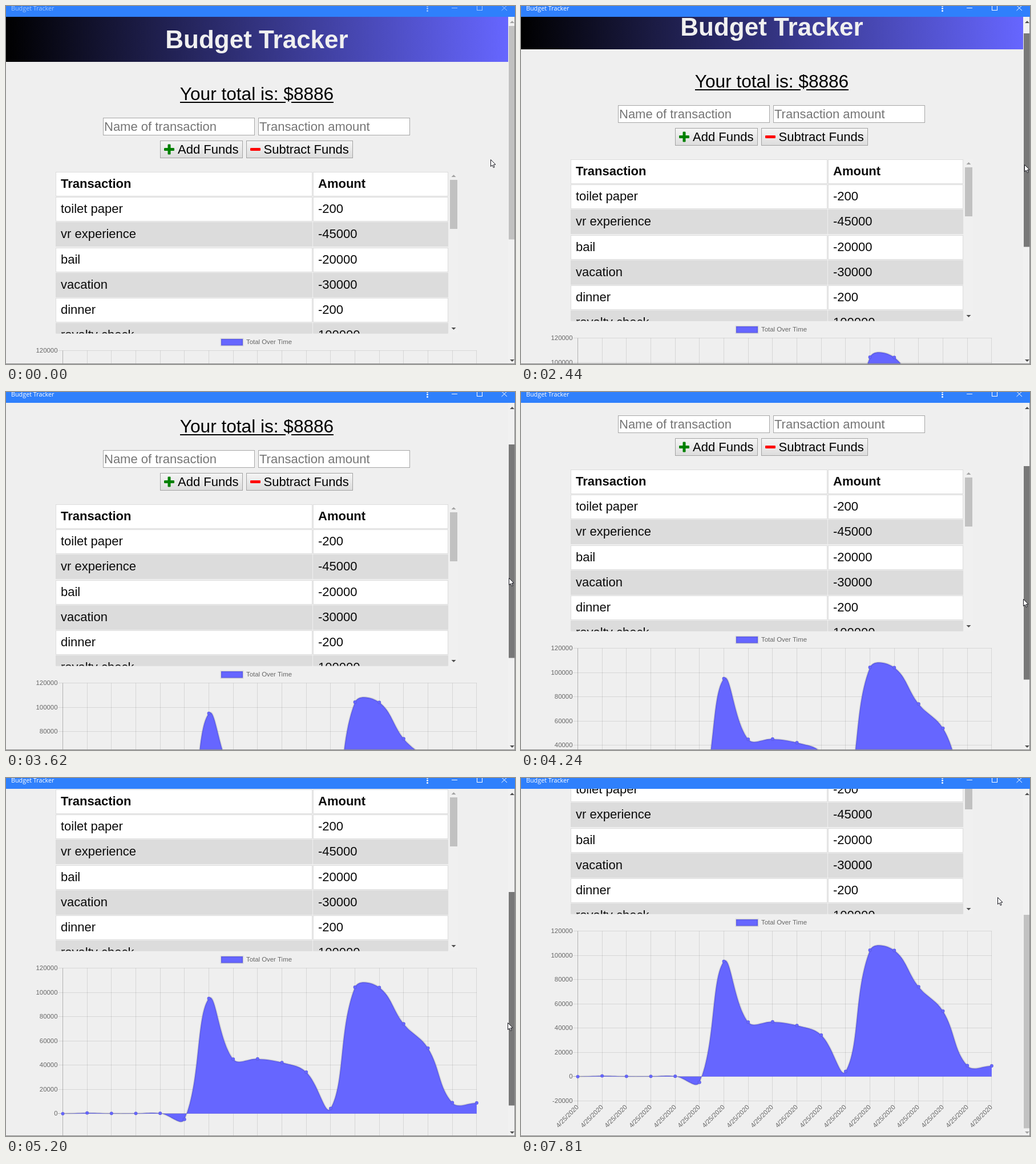
An HTML page with a canvas for the animation above (8 s loop, 892 by 628 pixels).

```html
<!DOCTYPE html>
<html lang="en">
<head>
<meta charset="utf-8">
<title>Budget Tracker</title>
<style>
html, body { margin: 0; width: 100%; height: 100%; overflow: hidden; background: #efefef; }
canvas { display: block; }
</style>
</head>
<body>
<canvas id="stage" width="892" height="628"></canvas>
<script>
const ctx = document.getElementById('stage').getContext('2d');
const LOOP = 8000, BAR = 19, PAGE_W = 880, MAX_SCROLL = 336;
const SANS = '"Liberation Sans", Arial, sans-serif';
const BLUE = '#6666ff';

// Stepped movement: first step, last step, number of steps, then scroll, x, y reached
const MOVES = [
  [0, 0, 1, 0, 849, 269],
  [130, 130, 1, 0, 867, 270],
  [270, 270, 1, 0, 882, 266],
  [2130, 2440, 3, 22, 882, 278],
  [2570, 3090, 5, 62, 882, 305],
  [3210, 3620, 4, 94, 881, 326],
  [3780, 3940, 2, 135, 880, 351],
  [4240, 4630, 3, 196, 879, 388],
  [4830, 5200, 3, 271, 879, 429],
  [5330, 6030, 6, 311, 877, 454],
  [6170, 6340, 2, 336, 874, 472],
  [6600, 6870, 3, 336, 874, 509],
  [7150, 7540, 4, 336, 824, 262],
  [7670, 7810, 2, 336, 835, 209]
];

const ROWS = [
  ['Transaction', 'Amount'],
  ['toilet paper', '-200'],
  ['vr experience', '-45000'],
  ['bail', '-20000'],
  ['vacation', '-30000'],
  ['dinner', '-200'],
  ['royalty check', '100000']
];

const TOTALS = [0, 600, 200, 200, 300, -4700, 95000, 45000, 45200, 42200, 34286,
  4286, 104286, 104086, 74086, 54086, 9086, 8886];

const chart = { left: 99.5, top: 604.5, dx: 42.67, dy: 42.55 };
chart.right = chart.left + 17 * chart.dx;
chart.bottom = chart.top + 7 * chart.dy;
chart.zero = chart.top + 6 * chart.dy;

function stateAt(t) {
  let prev = MOVES[0].slice(3), now = prev;
  for (const [from, to, n, ...end] of MOVES) {
    if (t < from) break;
    const gap = n > 1 ? (to - from) / (n - 1) : 1;
    const done = Math.min(n, Math.floor((t - from) / gap + 1e-6) + 1) / n;
    now = end.map((v, i) => Math.round(prev[i] + (v - prev[i]) * done));
    prev = end;
  }
  return { scroll: now[0], x: now[1], y: now[2] };
}

function rect(x, y, w, h, color) {
  ctx.fillStyle = color;
  ctx.fillRect(x, y, w, h);
}

function box(x, y, w, h, fill, border) {
  rect(x, y, w, h, border);
  rect(x + 1, y + 1, w - 2, h - 2, fill);
}

function text(str, x, y, size, color, weight = '', family = SANS) {
  ctx.font = `${weight} ${size}px ${family}`;
  ctx.fillStyle = color;
  ctx.fillText(str, x, y);
}

function line(x1, y1, x2, y2, color, width = 1) {
  ctx.strokeStyle = color;
  ctx.lineWidth = width;
  ctx.beginPath();
  ctx.moveTo(x1, y1);
  ctx.lineTo(x2, y2);
  ctx.stroke();
}

function clip(x, y, w, h) {
  ctx.save();
  ctx.beginPath();
  ctx.rect(x, y, w, h);
  ctx.clip();
}

function arrow(x, y, dir, color) {
  ctx.fillStyle = color;
  ctx.beginPath();
  ctx.moveTo(x - 4, y - 2 * dir);
  ctx.lineTo(x + 4, y - 2 * dir);
  ctx.lineTo(x, y + 2 * dir);
  ctx.fill();
}

function pill(x, y, w, h, color) {
  ctx.fillStyle = color;
  ctx.beginPath();
  ctx.roundRect(x, y, w, h, 1.3);
  ctx.fill();
}

function drawHeader() {
  const g = ctx.createLinearGradient(0, 0, PAGE_W, 0);
  g.addColorStop(0, '#000');
  g.addColorStop(1, BLUE);
  rect(0, 19, PAGE_W, 79, g);
  ctx.textAlign = 'center';
  text('Budget Tracker', 439.5, 74, 44, '#f0f0f0', 'bold');
  text('Your total is: $8886', 439.5, 165, 31.6, '#000');
  ctx.textAlign = 'left';
  rect(305, 168, 185, 2, '#000');
  rect(500, 168, 74, 2, '#000');
}

function drawButton(x, w, label, labelX) {
  const g = ctx.createLinearGradient(0, 237, 0, 267);
  g.addColorStop(0, '#f5f5f5');
  g.addColorStop(1, '#dcdcdc');
  box(x, 236, w, 31, g, '#a2a2a2');
  text(label, labelX, 259, 22, '#000');
}

function drawForm() {
  box(170, 196, 266, 31, '#fff', '#a6a6a6');
  box(442, 196, 266, 31, '#fff', '#a6a6a6');
  text('Name of transaction', 172, 219, 22, '#757575');
  text('Transaction amount', 444, 219, 22, '#757575');
  drawButton(270, 145, 'Add Funds', 301);
  drawButton(421, 187, 'Subtract Funds', 451.5);
  pill(277, 249, 18, 5, '#008000');
  pill(283.5, 242.5, 5, 18, '#008000');
  pill(428, 249, 18, 5, '#ff0000');
}

function drawTable() {
  clip(80, 285, 720, 289.5);
  ROWS.forEach(([name, amount], i) => {
    const y = Math.round(291 + i * 44.17);
    const fill = i && i % 2 === 0 ? '#dcdcdc' : '#fff';
    const weight = i ? '' : 'bold';
    box(87, y, 450, 43, fill, '#dcdcdc');
    box(538, y, 237, 43, fill, '#dcdcdc');
    text(name, 96, y + 28, 22, '#0a0a0a', weight);
    text(amount, 547, y + 28, 22, '#0a0a0a', weight);
  });
  rect(777, 291, 15, 284, '#f0f0f0');
  rect(778, 305, 13, 86, '#c1c1c1');
  arrow(784.5, 298, -1, '#a3a3a3');
  arrow(784.5, 566, 1, '#505050');
  ctx.restore();
}

// Cardinal spline whose handles are weighted by the neighbouring distances
function curvePath(pts) {
  const handles = pts.map((p, i) => {
    const a = pts[i - 1] || p, b = pts[i + 1] || p;
    const da = Math.hypot(p.x - a.x, p.y - a.y), db = Math.hypot(b.x - p.x, b.y - p.y);
    const ka = 0.4 * da / (da + db), kb = 0.4 * db / (da + db);
    const vx = b.x - a.x, vy = b.y - a.y;
    return [p.x - ka * vx, p.y - ka * vy, p.x + kb * vx, p.y + kb * vy];
  });
  const path = new Path2D();
  path.moveTo(pts[0].x, pts[0].y);
  for (let i = 1; i < pts.length; i++) {
    path.bezierCurveTo(handles[i - 1][2], handles[i - 1][3],
      handles[i][0], handles[i][1], pts[i].x, pts[i].y);
  }
  return path;
}

const points = TOTALS.map((v, i) => ({
  x: chart.left + i * chart.dx,
  y: chart.zero - v / 20000 * chart.dy
}));
const curve = curvePath(points);
const area = new Path2D(curve);
area.lineTo(chart.right, chart.zero);
area.lineTo(chart.left, chart.zero);
area.closePath();

function drawGrid() {
  const { left, right, top, bottom, dx, dy } = chart;
  const color = zero => zero ? 'rgba(0,0,0,.25)' : 'rgba(0,0,0,.1)';
  ctx.textBaseline = 'middle';
  ctx.textAlign = 'right';
  for (let i = 0; i < 8; i++) {
    const y = Math.floor(top + i * dy) + 0.5;
    line(left - 8.5, y, right, y, color(i === 6));
    text(String(120000 - i * 20000), 90.5, y, 11.4, '#666');
  }
  for (let i = 0; i < 18; i++) {
    const x = Math.floor(left + i * dx) + 0.5;
    line(x, top, x, bottom + 9, color(i === 0));
    ctx.save();
    ctx.translate(x, bottom + 9.5);
    ctx.rotate(-Math.PI / 4);
    text(i < 17 ? '4/25/2020' : '4/28/2020', 0, 0, 11.4, '#666');
    ctx.restore();
  }
  ctx.textAlign = 'left';
}

function drawChart() {
  rect(377, 584, 38, 11.5, BLUE);
  ctx.strokeStyle = 'rgba(0,0,0,.1)';
  ctx.lineWidth = 2.85;
  ctx.strokeRect(377, 584, 38, 11.5);
  drawGrid();
  text('Total Over Time', 421, 589.5, 11.4, '#666');
  ctx.textBaseline = 'alphabetic';

  ctx.fillStyle = BLUE;
  ctx.fill(area);
  ctx.strokeStyle = 'rgba(0,0,0,.1)';
  ctx.lineWidth = 2.85;
  ctx.stroke(curve);
  ctx.lineWidth = 1;
  for (const p of points) {
    ctx.beginPath();
    ctx.arc(p.x, p.y, 2.85, 0, 7);
    ctx.fillStyle = BLUE;
    ctx.fill();
    ctx.stroke();
  }
}

function drawScrollbar(t, scroll) {
  const dragging = t >= 1430 && t < 7150;
  const hover = t >= 270 && t < 1430;
  rect(PAGE_W, BAR, 12, 609, '#f1f1f1');
  rect(881, 35 + Math.round(scroll * 0.61), 10, 374.5,
    dragging ? '#787878' : hover ? '#a8a8a8' : '#c1c1c1');
  arrow(887, 28, -1, scroll > 0 ? '#505050' : '#a3a3a3');
  arrow(887, 622, 1, scroll < MAX_SCROLL ? '#505050' : '#a3a3a3');
  rect(891, BAR, 1, 609, '#8c8c8c');
  rect(0, 627, 892, 1, '#8c8c8c');
}

function drawTitleBar(focused) {
  const ink = focused ? '#fff' : '#a3c7fd';
  rect(0, 0, 892, BAR, '#2f80fc');
  text('Budget Tracker', 9, 7.5, 10.8, ink, '', '"Open Sans", "Noto Sans", sans-serif');
  ctx.fillStyle = ink;
  for (let i = 0; i < 3; i++) {
    ctx.beginPath();
    ctx.arc(738.5, i * 4.3, 1.5, 0, 7);
    ctx.fill();
  }
  line(781, 3.5, 791, 3.5, ink);
  ctx.strokeRect(825.5, -1.5, 9, 9);
  line(868.5, -1, 878, 8, ink);
  line(868.5, 8, 878, -1, ink);
}

function drawCursor(x, y) {
  const shape = [[0, 0], [0, 12], [2.8, 9.6], [4.8, 14], [6.6, 13.2], [4.8, 8.9], [8.4, 8.6]];
  ctx.beginPath();
  shape.forEach(([dx, dy]) => ctx.lineTo(x + 0.5 + dx, y + 0.5 + dy));
  ctx.closePath();
  ctx.fillStyle = '#fff';
  ctx.fill();
  ctx.strokeStyle = '#16161e';
  ctx.lineWidth = 1;
  ctx.stroke();
}

function render(t) {
  const { scroll, x, y } = stateAt(t);
  rect(0, 0, 892, 628, '#efefef');
  clip(0, BAR, PAGE_W, 608);
  ctx.translate(0, -scroll);
  drawHeader();
  drawForm();
  drawTable();
  drawChart();
  ctx.restore();
  drawScrollbar(t, scroll);
  drawTitleBar(t >= 1430);
  drawCursor(x, y);
}

const start = performance.now();
function tick() {
  render((performance.now() - start) % LOOP);
  requestAnimationFrame(tick);
}
tick();
</script>
</body>
</html>
```
